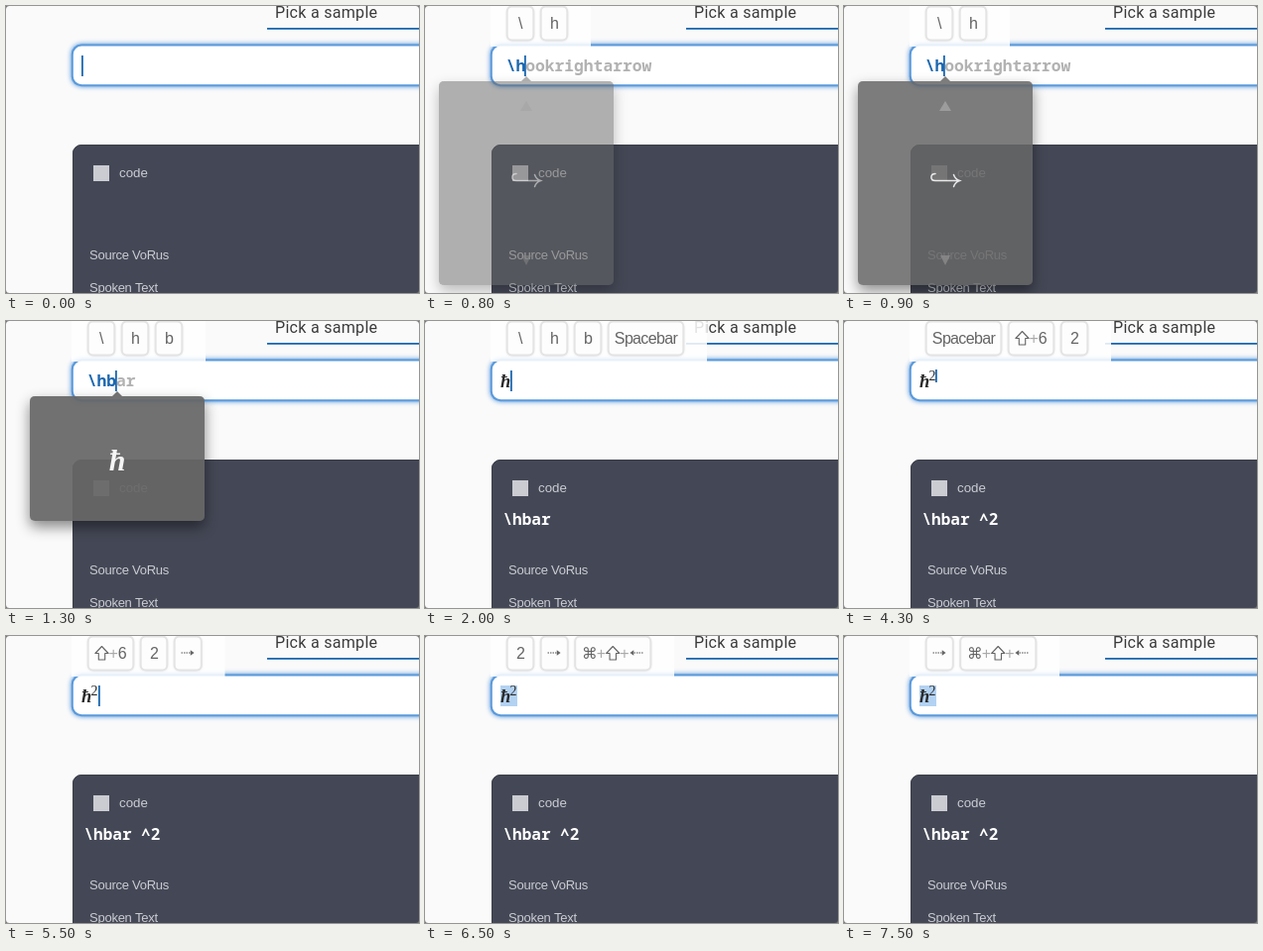
These frames come from a looping animation (416 by 290 pixels, 8000 ms). An HTML page with a canvas:

```html
<!DOCTYPE html>
<html lang="en">
<head>
<meta charset="utf-8">
<title>Formula editor</title>
<style>
  html, body { margin: 0; width: 100%; height: 100%; overflow: hidden; background: #fafafa; }
  canvas { display: block; width: 416px; height: 290px; }
</style>
</head>
<body>
<canvas id="stage"></canvas>
<script>
const W = 416, H = 290, LOOP = 8000;
const canvas = document.getElementById('stage');
const ctx = canvas.getContext('2d');
const dpr = window.devicePixelRatio || 1;
canvas.width = W * dpr;
canvas.height = H * dpr;

const SANS = '"Liberation Sans", sans-serif';
const MONO = '"Noto Sans Mono", monospace';
const SERIF = '"Liberation Serif", serif';
const ICON = '"DejaVu Sans", sans-serif';
const BLUE = '#1c68b0';
const KEY_INK = '#646464';

// Pressed keys: parts, width, time shown, time gone
const KEYS = [
  { parts: ['\\'], w: 28, on: 100, off: 3100 },
  { parts: ['h'], w: 28, on: 800, off: 3900 },
  { parts: ['b'], w: 28, on: 1300, off: 4300 },
  { parts: ['Spacebar'], w: 77, on: 1900, off: 5000 },
  { parts: ['⇧', '+', '6'], w: 47, on: 3000, off: 6100 },
  { parts: ['2'], w: 28, on: 3900, off: 6900 },
  { parts: ['⇢'], w: 28.5, on: 5000, off: LOOP },
  { parts: ['⌘', '+', '⇧', '+', '⇠'], w: 77.5, on: 6500, off: LOOP }
];
const KEY_GAP = 6;

// Caret spans: from, to, x, top, height
const CARETS = [
  [0, 100, 77, 50, 21],
  [100, 500, 91.5, 50, 21],
  [800, 1300, 101, 50, 21],
  [1300, 1900, 111, 50, 21],
  [1900, 2400, 87, 50, 21],
  [3000, 3500, 88.5, 49, 13],
  [3900, 4500, 93, 49, 13],
  [5000, 5700, 94, 50, 21],
  [6100, 6500, 94, 50, 21]
];

const within = (t, a, b) => t >= a && t < b;
const clamp = v => Math.max(0, Math.min(1, v));

function text(str, x, y, font, color, spacing = 0, align = 'left') {
  ctx.font = font;
  ctx.fillStyle = color;
  ctx.textAlign = align;
  ctx.letterSpacing = spacing + 'px';
  ctx.fillText(str, x, y);
}

function box(x, y, w, h, r) {
  ctx.beginPath();
  ctx.roundRect(x, y, w, h, r);
}

function shadow(color, blur, dy = 0) {
  ctx.shadowColor = color;
  ctx.shadowBlur = blur * dpr;
  ctx.shadowOffsetY = dy * dpr;
}

function trace(points) {
  ctx.beginPath();
  points.forEach(([x, y]) => ctx.lineTo(x, y));
  ctx.closePath();
}

function poly(points, color) {
  trace(points);
  ctx.fillStyle = color;
  ctx.fill();
}

function drawPage() {
  ctx.fillStyle = '#fafafa';
  ctx.fillRect(0, 0, W, H);
  text('Pick a sample', 271, 12, '16px Roboto, sans-serif', '#3a3a3a', 0.3);
  ctx.fillStyle = BLUE;
  ctx.fillRect(263, 22, W - 263, 1.8);

  // Focus ring lies outside the white field
  ctx.save();
  shadow('rgba(50,130,215,.9)', 5);
  ctx.fillStyle = '#5b9adb';
  box(65.8, 38.5, 400, 42.8, 10);
  ctx.fill();
  ctx.restore();
  ctx.fillStyle = '#fff';
  box(67.8, 40.5, 400, 38.8, 8.5);
  ctx.fill();
}

function drawOutput(t) {
  ctx.fillStyle = '#444856';
  box(67, 140, 400, 200, 9);
  ctx.fill();
  ctx.lineWidth = 1;
  ctx.strokeStyle = '#3b3e48';
  box(67.5, 140.5, 400, 200, 8.5);
  ctx.stroke();

  const label = '#cbccd2';
  ctx.fillStyle = label;
  ctx.fillRect(88, 161, 16, 16);
  text('code', 114, 173, '13.3px ' + SANS, label);
  text('Source VoRus', 84, 256, '13px ' + SANS, label, -0.25);
  text('Spoken Text', 84, 289, '13px ' + SANS, label, -0.25);

  if (t >= 1900) {
    const code = '\\hbar' + (t >= 3900 ? ' ^2' : t >= 3000 ? ' ^{}' : '');
    text(code, 78.5, 206, '600 16px ' + MONO, '#fff');
  }
}

function drawInput(t) {
  if (t >= 6500) {
    ctx.fillStyle = '#b3d2f2';
    ctx.fillRect(76, 50, 17, 21);
  }
  if (within(t, 100, 1900)) {
    const typed = t < 800 ? '\\' : t < 1300 ? '\\h' : '\\hb';
    const hint = t < 800 ? '' : t < 1300 ? 'ookrightarrow' : 'ar';
    const font = 'bold 16.3px ' + MONO;
    text(typed, 81.7, 66, font, BLUE);
    text(hint, 81.7 + ctx.measureText(typed).width, 66, font, '#b2b2b2');
  }
  if (t >= 1900) text('ħ', 76, 66.5, 'italic bold 18.5px ' + SERIF, '#2a2a2a');
  if (t >= 3900) text('2', 85.5, 59.5, '14px ' + SERIF, '#2a2a2a');

  const caret = CARETS.find(c => within(t, c[0], c[1]));
  if (caret) {
    ctx.fillStyle = BLUE;
    ctx.fillRect(caret[2] - 1, caret[3], 1.8, caret[4]);
  }
}

function drawDottedArrow(x, y, dir) {
  ctx.fillStyle = KEY_INK;
  for (const d of [-6, -3.5, -1, 1.5]) {
    ctx.fillRect(x + dir * d - 0.7, y - 0.6, 1.4, 1.2);
  }
  poly([[x + dir * 2.5, y - 2.8], [x + dir * 6.3, y], [x + dir * 2.5, y + 2.8]], KEY_INK);
}

function drawShift(x, y) {
  trace([[x, y - 7], [x + 6.6, y], [x + 3.2, y], [x + 3.2, y + 6.5],
    [x - 3.2, y + 6.5], [x - 3.2, y], [x - 6.6, y]]);
  ctx.lineWidth = 1.1;
  ctx.lineJoin = 'round';
  ctx.strokeStyle = KEY_INK;
  ctx.stroke();
}

const isIcon = p => '⇧⌘⇠⇢'.includes(p);

function drawKey(key, x) {
  ctx.save();
  shadow('rgba(0,0,0,.16)', 3, 0.5);
  ctx.fillStyle = '#fdfdfd';
  box(x + 0.7, 0.5, key.w - 1.4, 34, 5);
  ctx.fill();
  ctx.restore();
  ctx.lineWidth = 2;
  ctx.strokeStyle = '#e4e4e4';
  ctx.stroke();

  const font = '16px ' + SANS;
  if (key.parts.length === 1 && !isIcon(key.parts[0])) {
    text(key.parts[0], x + key.w / 2, 23, font, KEY_INK, -0.65, 'center');
    return;
  }
  const advance = p => isIcon(p) ? 14.5 : 9;
  let px = x + (key.w - key.parts.reduce((sum, p) => sum + advance(p), 0)) / 2;
  for (const p of key.parts) {
    const cx = px + advance(p) / 2;
    if (p === '⇢' || p === '⇠') drawDottedArrow(cx, 17, p === '⇢' ? 1 : -1);
    else if (p === '⇧') drawShift(cx, 17.5);
    else if (p === '⌘') text(p, cx, 23, '15.5px ' + ICON, KEY_INK, 0, 'center');
    else text(p, cx, 23, font, p === '+' ? '#aaa' : KEY_INK, 0, 'center');
    px += advance(p);
  }
}

function drawKeys(t) {
  const shown = KEYS.filter(k => within(t, k.on, k.off));
  if (!shown.length) return;
  const width = shown.reduce((sum, k) => sum + k.w + KEY_GAP, 0);
  ctx.save();
  ctx.globalAlpha = clamp(0.4 + (t - 100) / 330);
  ctx.fillStyle = 'rgba(255,255,255,.85)';
  ctx.fillRect(66, 0, width + 33, 41);
  let x = 82;
  for (const key of shown) {
    drawKey(key, x);
    x += key.w + KEY_GAP;
  }
  ctx.restore();
}

function drawPopup(t) {
  if (!within(t, 800, 1900)) return;
  const first = t < 1300;
  const cx = first ? 102 : 112;
  const h = first ? 206 : 126;
  const alpha = first
    ? 0.96 - 0.46 * Math.exp(-(t - 800) / 70)
    : 0.93 + 0.04 * clamp((t - 1300) / 200);

  // Shadow only outside the card, so the card stays translucent
  ctx.save();
  ctx.globalAlpha = alpha;
  ctx.beginPath();
  ctx.rect(0, 0, W, H);
  ctx.roundRect(cx - 88, 76, 176, h, 5);
  ctx.clip('evenodd');
  shadow('rgba(0,0,0,.5)', 14, 6);
  ctx.fillStyle = '#676767';
  box(cx - 88, 76, 176, h, 5);
  ctx.fill();
  ctx.restore();

  ctx.save();
  ctx.globalAlpha = alpha;
  ctx.fillStyle = '#676767';
  box(cx - 88, 76, 176, h, 5);
  ctx.fill();
  poly([[cx - 5, 76], [cx, 71], [cx + 5, 76]], '#676767');
  if (first) {
    poly([[96, 106], [102, 96], [108, 106]], '#a2a2a2');
    poly([[97, 252], [102, 262], [107, 252]], '#8a8a8a');
    drawHookArrow();
  } else {
    text('ħ', cx, 151, 'italic bold 30px ' + SERIF, '#fff', 0, 'center');
  }
  ctx.restore();
}

function drawHookArrow() {
  ctx.strokeStyle = '#fff';
  ctx.lineWidth = 1.5;
  ctx.lineCap = 'round';
  ctx.beginPath();
  ctx.moveTo(92, 169.5);
  ctx.bezierCurveTo(86.5, 169.5, 86.5, 176.5, 92, 176.5);
  ctx.lineTo(116, 176.5);
  ctx.moveTo(110.5, 170.5);
  ctx.quadraticCurveTo(112, 175, 116.5, 176.5);
  ctx.quadraticCurveTo(112, 178, 110.5, 182.5);
  ctx.stroke();
}

function drawCorners() {
  ctx.beginPath();
  ctx.rect(0, 0, W, H);
  ctx.roundRect(0, 0, W, H, 3.5);
  ctx.fillStyle = '#777';
  ctx.fill('evenodd');
}

function frame() {
  const t = performance.now() % LOOP;
  ctx.setTransform(dpr, 0, 0, dpr, 0, 0);
  drawPage();
  drawOutput(t);
  drawInput(t);
  drawKeys(t);
  drawPopup(t);
  drawCorners();
  requestAnimationFrame(frame);
}
frame();
</script>
</body>
</html>
```
